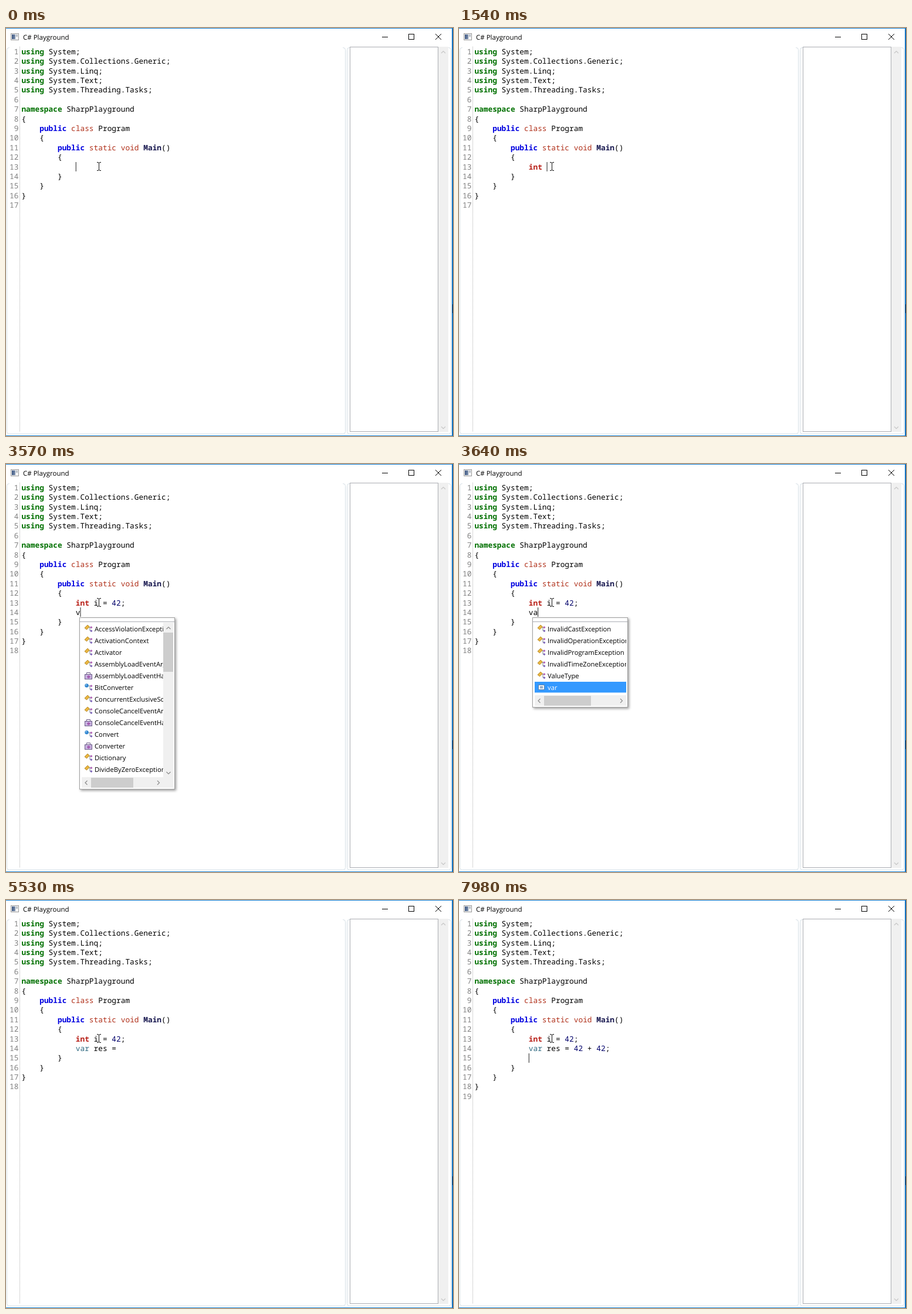
Write an HTML page that moves like this. It is 762 px wide and 697 px high and loops after 8000 ms.

```html
<!DOCTYPE html>
<html lang="en">
<head>
<meta charset="utf-8">
<title>Code editor</title>
<style>
html, body { margin: 0; width: 100%; height: 100%; overflow: hidden; background: #fff; }
svg { display: block; }
text { white-space: pre; text-rendering: geometricPrecision; }
.ui { font-family: "Open Sans", "Noto Sans", sans-serif; font-size: 11.25px; }
.code { font-family: "Noto Sans Mono", "DejaVu Sans Mono", monospace; font-size: 12.83px; }
.num { fill: #808080; text-anchor: end; }
.green { fill: #007000; font-weight: bold; }
.blue { fill: #0000e0; font-weight: bold; }
.navy { fill: #191950; font-weight: bold; }
.red { fill: #b82018; font-weight: bold; }
.brown { fill: #b0301a; }
.teal { fill: #2f6a80; }
.digit { fill: #00006b; }
.popup { filter: drop-shadow(2px 2px 2px rgba(0, 0, 0, .4)); }
.arrow { fill: none; stroke: #8c8c8c; stroke-width: 1.2; }
.arrow.off { stroke: #c6c6c6; }
.crisp { shape-rendering: crispEdges; }
</style>
</head>
<body>
<svg width="762" height="697" viewBox="0 0 762 697">
  <defs>
    <g id="parts">
      <path d="M7 5h3v6h2M10 5h2" fill="none" stroke="#7d8798"/>
      <path d="M12 3l2.5 2-2 2.2-2-2z" fill="#b05fb4"/>
      <path d="M12 9l2.5 2-2 2.2-2-2z" fill="#7b62b8"/>
    </g>
    <g id="class">
      <use href="#parts"/>
      <path d="M1 6l5-5 3.5 3-5 5z" fill="#e9b640" stroke="#a87a1c" stroke-width=".8"/>
    </g>
    <g id="static">
      <use href="#parts"/>
      <circle cx="4.5" cy="4.5" r="3.2" fill="#2f86d0"/>
      <circle cx="3.6" cy="3.4" r="1" fill="#b5dcf8"/>
    </g>
    <g id="delegate">
      <path d="M4.500 5V2.500h6V5" fill="none" stroke="#6b5a86"/>
      <rect x="1.500" y="5.500" width="12" height="8" fill="#c9b6e2" stroke="#6b5a86"/>
      <path d="M7.500 7l4 2.500-4 3-3-3z" fill="#a45cb0"/>
    </g>
    <g id="interface">
      <path d="M2 7.500h8" stroke="#71808e" stroke-width="1.400"/>
      <circle cx="2.600" cy="7.500" r="1.700" fill="#8b98a4"/>
      <circle cx="12" cy="7.500" r="2.600" fill="#e8eef4" stroke="#5d6f80" stroke-width="1.300"/>
    </g>
    <g id="keyword">
      <rect x="2.500" y="3.500" width="10" height="8" fill="#eef4fb" stroke="#6184a8"/>
      <path d="M5 6.500h5M5 8.500h5" stroke="#4a6c92"/>
    </g>
    <g id="enum">
      <rect x="1.500" y="2.500" width="9" height="8" fill="#f0d48a" stroke="#9a7c33"/>
      <path d="M4 5.500h5M4 7.500h5" stroke="#6d5a2a"/>
    </g>
    <linearGradient id="pane" x2="1"><stop stop-color="#35507c"/><stop offset="1" stop-color="#8799b4"/></linearGradient>
  </defs>

  <rect width="762" height="697" fill="#fff"/>
  <g fill="none" stroke="#d5dfe5">
    <rect x="1.500" y="33.500" width="577" height="660" rx="4"/>
    <rect x="581.500" y="33.500" width="177" height="660" rx="4"/>
  </g>
  <rect x="6" y="32" width="568" height="658" fill="#fff"/>
  <rect x="586" y="32" width="168" height="658" fill="#f0f0f0"/>
  <rect x="586.500" y="32.500" width="150" height="657" fill="#fff" stroke="#abadb3"/>
  <path class="arrow off" d="M742 43l3.500-3.500 3.500 3.500M742 681l3.500 3.500 3.500-3.500"/>
  <path d="M23.500 32V690" stroke="#b0b0b0" stroke-dasharray="1 1" class="crisp"/>

  <g class="crisp">
    <rect width="761" height="1" fill="#1883d7"/>
    <rect y="696" width="761" height="1" fill="#1883d7"/>
    <rect x="760" width="1" height="697" fill="#1883d7"/>
    <rect x="761" width="1" height="697" fill="#0d62ac"/>
    <rect x="761" y="472" width="1" height="15" fill="#0a1c38"/>
  </g>

  <rect x="8.500" y="9.500" width="13" height="11" fill="#f4f4f4" stroke="#9b9b9b"/>
  <rect x="10" y="11" width="6" height="8" fill="url(#pane)"/>
  <rect x="17" y="11" width="3" height="4" fill="#b9c0c8"/>
  <text class="ui" x="29" y="20" style="font-size:11.5px">C# Playground</text>
  <path d="M641 15.500h10M686.500 10.500h9v9h-9z" fill="none" stroke="#000" class="crisp"/>
  <path d="M732 10l10 10M742 10l-10 10" stroke="#000"/>

  <g id="code" class="code"></g>
  <rect id="caret" width="1" height="16" fill="#222"/>
  <g id="popup" class="popup"></g>
  <path d="M155 229.500h2l1.500 1 1.500-1h2M158.500 230v13M155 243.500h2l1.500-1 1.500 1h2" fill="none" stroke="#111"/>
</svg>

<script>
const LOOP = 8000, LEFT = 26.4, CHAR = 7.697, LINE = 16.39;
const HEAD = `using System;
using System.Collections.Generic;
using System.Linq;
using System.Text;
using System.Threading.Tasks;

namespace SharpPlayground
{
    public class Program
    {
        public static void Main()
        {
`;
const TAIL = `
        }
    }
}
`;
const INDENT = ' '.repeat(12);
const TOP_ROW = 12;

const STYLE = {
  using: 'green', namespace: 'green', public: 'blue', in: 'blue', class: 'brown',
  static: 'brown', void: 'brown', Main: 'navy', int: 'red', var: 'teal'
};
const TOKEN = new RegExp(`\\b(${Object.keys(STYLE).join('|')})\\b|\\d+`, 'g');

// Items carry a one-letter kind; vertical thumb is [top, height].
const KINDS = { c: 'class', s: 'static', d: 'delegate', i: 'interface', k: 'keyword', e: 'enum' };
const LISTS = {
  i: {
    items: 'i:ICloneable i:ICollection i:IComparable i:IComparer i:IConvertible i:ICustomFormatter i:IDictionary i:IDisposable i:IEnumerable i:IEnumerator i:IEqualityComparer i:IEquatable k:if',
    pick: 12, thumb: [109, 13], wide: 61
  },
  in: {
    items: 'c:AppDomain d:AppDomainInitializer c:AppDomainManager c:AppDomainSetup c:AppDomainUnloadedException k:continue c:EntryPointNotFoundException k:finally k:in c:IndexOutOfRangeException c:InsufficientMemoryException k:int c:Int16 c:Int32',
    pick: 8, thumb: [26, 60], wide: 61
  },
  int: {
    items: 'c:EntryPointNotFoundException k:int c:Int16 c:Int32 c:Int64 k:interface k:internal c:IntPtr k:uint c:UInt16 c:UInt32 c:UInt64 c:UIntPtr',
    pick: 1, wide: 72
  },
  v: {
    items: 'c:AccessViolationException c:ActivationContext c:Activator c:AssemblyLoadEventArgs d:AssemblyLoadEventHandler s:BitConverter c:ConcurrentExclusiveSchedulerPair c:ConsoleCancelEventArgs d:ConsoleCancelEventHandler s:Convert d:Converter c:Dictionary c:DivideByZeroException c:EventArgs',
    pick: -1, thumb: [26, 67], wide: 72
  },
  va: {
    items: 'c:InvalidCastException c:InvalidOperationException c:InvalidProgramException c:InvalidTimeZoneException c:ValueType k:var',
    pick: 5, wide: 80
  },
  var: { items: 'e:EnvironmentVariableTarget k:var', pick: 1, wide: 80 }
};

// Each step: time, then '+text' to type, 'on'/'off' for the caret; optional list.
const STEPS = [
  [0, 'on'], [350, 'off'], [840, 'on'],
  [1050, '+i', 'i'], [1190, '+n', 'in'], [1330, '+t', 'int'], [1540, '+ '],
  [1820, '+i'], [1960, '+ '], [2100, '+='], [2240, '+ '], [2310, '+4'], [2450, '+2'], [2590, '+;'],
  [3010, '+\n'], [3500, 'off'],
  [3570, '+v', 'v'], [3640, '+a', 'va'], [3780, '+r', 'var'], [3920, '+ '], [4130, '+r'], [4270, '+e'],
  [4550, '+s'], [4760, '+ '], [4900, '+='], [5110, '+ '], [5530, 'off'],
  [5740, '+4'], [5880, '+2'], [6020, '+ '], [6160, '++'],
  [6580, '+ '], [6720, '+4'], [6860, '+2'], [7280, 'off'],
  [7560, '+;'], [7980, '+\n']
];

const get = id => document.getElementById(id);
const paint = s => s.replace(TOKEN, w => `<tspan class="${STYLE[w] || 'digit'}">${w}</tspan>`);

function drawCode(typed) {
  const body = typed.split('\n').map(s => INDENT + s).join('\n');
  get('code').innerHTML = (HEAD + body + TAIL).split('\n').map((s, i) => {
    const y = Math.round(40.85 + LINE * i) + 4;
    return `<text class="num" x="21.4" y="${y}">${i + 1}</text><text x="${LEFT}" y="${y}">${paint(s)}</text>`;
  }).join('');
}

function drawCaret(typed, shown) {
  const lines = typed.split('\n');
  const caret = get('caret');
  caret.setAttribute('x', LEFT + CHAR * (INDENT.length + lines.at(-1).length));
  caret.setAttribute('y', Math.round(32.3 + LINE * (TOP_ROW + lines.length - 1)));
  caret.style.display = shown ? '' : 'none';
}

function drawItem(item, i, picked) {
  const [kind, name] = item.split(':');
  const y = 1 + 20 * i;
  return (picked ? `<rect y="${y}" width="160" height="18.500" fill="#39f"/>` : '') +
    `<use href="#${KINDS[kind]}" x="4" y="${y + 2}"/>` +
    `<text class="ui" x="22" y="${y + 14}"${picked ? ' fill="#fff"' : ''}>${name}</text>`;
}

function drawPopup(key, row) {
  const box = get('popup');
  if (!key) { box.innerHTML = ''; return; }
  const { items, pick, thumb, wide } = LISTS[key];
  const all = items.split(' ');
  const end = 13 + 20 * Math.min(13, all.length);
  const right = thumb ? 143 : 160;
  const arrowX = right - 10;
  const bar = thumb ? `<rect x="143" y="9" width="17" height="${end - 9}" fill="#f0f0f0"/>
    <rect x="143" y="${thumb[0]}" width="17" height="${thumb[1]}" fill="#cdcdcd"/>
    <path class="arrow" d="M148.500 20l3.500-3.500 3.500 3.500M148.500 ${end - 9}l3.500 3.500 3.500-3.500"/>` : '';
  box.setAttribute('transform', `translate(125 ${row ? 262 : 245})`);
  box.innerHTML = `<rect x=".5" y=".5" width="162" height="${end + 20}" fill="#fff" stroke="#a0a0a0"/>
    <path d="M1 7.500H162" stroke="#abadb3"/>
    <svg x="4" y="9" width="${right - 4}" height="${end - 9}">${all.map((s, i) => drawItem(s, i, i === pick)).join('')}</svg>
    ${bar}
    <rect x="4" y="${end}" width="156" height="18" fill="#f0f0f0"/>
    <rect x="20" y="${end + 1}" width="${wide}" height="17" fill="#cdcdcd"/>
    <path class="arrow" d="M13.500 ${end + 6}l-3.500 3.500 3.500 3.500M${arrowX} ${end + 6}l3.500 3.500-3.500 3.500"/>`;
}

let shown = -1;
function frame() {
  const t = performance.now() % LOOP;
  const at = STEPS.findLastIndex(s => s[0] <= t);
  if (at !== shown) {
    shown = at;
    const typed = STEPS.slice(0, at + 1).map(s => s[1][0] === '+' ? s[1].slice(1) : '').join('');
    drawCode(typed);
    drawCaret(typed, STEPS[at][1] !== 'off');
    drawPopup(STEPS[at][2], typed.includes('\n'));
  }
  requestAnimationFrame(frame);
}
frame();
</script>
</body>
</html>
```
